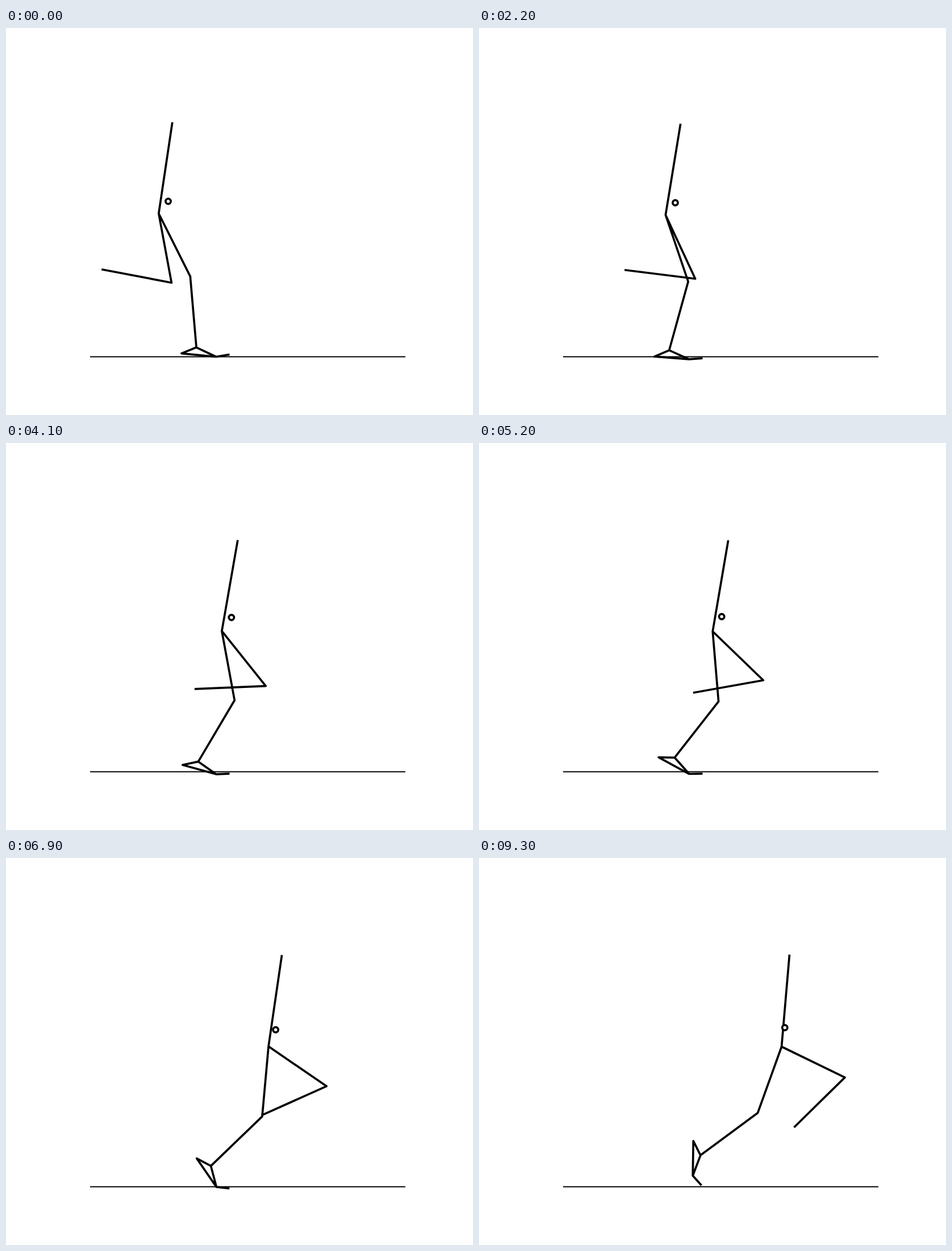
These frames come from a looping animation (822x681 px, 9.4 s). An HTML page:

```html
<!DOCTYPE html>
<html>
<head>
<meta charset="utf-8">
<style>
  html, body { margin: 0; height: 100%; overflow: hidden; background: #fff; }
  svg { display: block; }
  .body { fill: none; stroke: #000; stroke-width: 3.7; stroke-linejoin: round; }
</style>
</head>
<body>
<svg width="822" height="681" viewBox="0 0 822 681">
  <path d="M148 578.5H703" stroke="#000" stroke-width="2"/>
  <path id="figure" class="body"/>
  <circle id="mass" class="body" r="4.6" style="fill:#fff"/>
</svg>
<script>
const LOOP = 9400, STEP = 100, END = LOOP - STEP;
const TRUNK = 162.6, THIGH = 123.8, SHIN = 125.4, FOOT = 38.4, HEEL = 28.2;
const DEG = Math.PI / 180;

// A few key poses; angles in degrees, from straight down towards the right.
const keys = [0, 1400, 5200, 8100, END];
const tracks = {
  hipX: [268.8, 307.2, 411.3, 498.2, 532.6],
  hipY: [326.5, 328, 331.5, 331.5, 332],
  massX: [285.5, 324, 427.2, 507.5, 538.3],
  massY: [305, 307, 305.5, 300, 298.5],
  trunk: [171.5, 171.1, 170.3, 173.3, 175.1],
  swingThigh: [10.5, 19.3, 46, 60.6, 64.1],
  swingShin: [-100.8, -99.4, -79.9, -55.4, -45.5],
  heel: [-68, -66.1, -91, -137.9, -153.4]
};

// One smooth polynomial through all the keys.
const sample = (values, t) => values.reduce((sum, value, i) =>
  sum + keys.reduce((w, k, j) => j === i ? w : w * (t - k) / (keys[i] - k), value), 0);

const limb = ([x, y], length, angle) =>
  [x + length * Math.sin(angle * DEG), y + length * Math.cos(angle * DEG)];

// Places the knee in front of the line from hip to ankle.
function bendKnee(hip, ankle) {
  const dx = ankle[0] - hip[0], dy = ankle[1] - hip[1], d = Math.hypot(dx, dy);
  const cos = (THIGH ** 2 + d ** 2 - SHIN ** 2) / (2 * THIGH * d);
  return limb(hip, THIGH, (Math.atan2(dx, dy) + Math.acos(Math.min(1, cos))) / DEG);
}

const line = (...points) => 'M' + points.map(p => p.map(n => n.toFixed(2))).join('L');
const figure = document.getElementById('figure');
const mass = document.getElementById('mass');

function draw() {
  const t = Math.floor(performance.now() % LOOP / STEP) * STEP;
  const u = t / END, left = 1 - u;
  const p = {};
  for (const name in tracks) p[name] = sample(tracks[name], t);

  // The planted foot settles at first and peels off the ground at the end.
  const toe = [393.5 - 2 * u ** 8, 582 - 7.5 * left ** 8 - 6 * u ** 8];
  const ball = [369.8 + 6.5 * u ** 8, 583 - 4.5 * left ** 12 - 24 * u ** 6];
  const ankle = limb(ball, FOOT, p.heel - 47.3);
  const heel = limb(ankle, HEEL, p.heel);

  const hip = [p.hipX, p.hipY];
  const head = limb(hip, TRUNK, p.trunk);
  const swingKnee = limb(hip, THIGH, p.swingThigh);
  const swingAnkle = limb(swingKnee, SHIN, p.swingShin);

  figure.setAttribute('d',
    line(head, hip, swingKnee, swingAnkle) +
    line(hip, bendKnee(hip, ankle), ankle, heel, ball, toe) +
    line(ankle, ball));
  mass.setAttribute('cx', p.massX);
  mass.setAttribute('cy', p.massY);
  requestAnimationFrame(draw);
}
draw();
</script>
</body>
</html>
```
